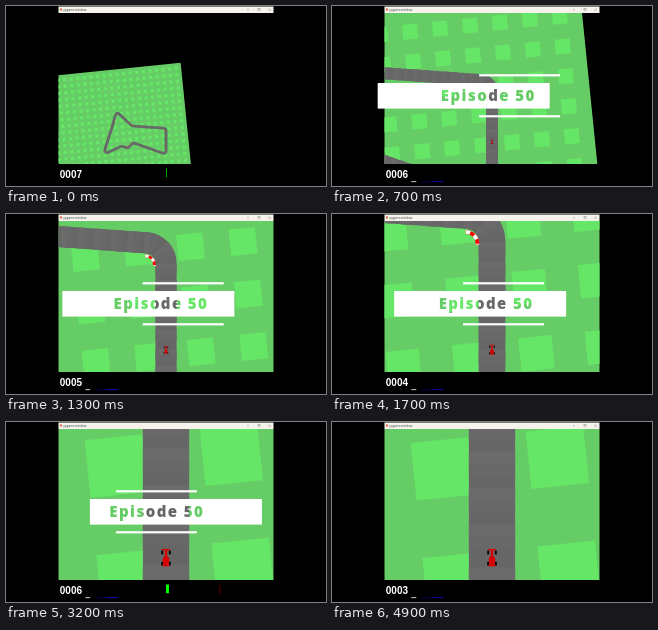
An HTML page with a canvas for the animation above (5000 ms loop, 320x180 px).

```html
<!DOCTYPE html>
<html>
<head>
<meta charset="utf-8">
<style>
html, body { margin: 0; height: 100%; overflow: hidden; background: #000; }
canvas { display: block; width: 320px; height: 180px; }
</style>
</head>
<body>
<canvas id="stage" width="320" height="180"></canvas>
<script>
const g = document.getElementById('stage').getContext('2d');
const layer = Object.assign(document.createElement('canvas'), { width: 320, height: 180 });
const b = layer.getContext('2d');
const LOOP = 5000, STEP = 100;
const HALF = 1000 / 3, TILE = HALF / 20, ROAD = 40 / 3;

// time (s), pixels per world unit
const zooms = [[0, .198], [.4, .534], [1, 1.27], [3.1, 3.467], [5, 3.467]];

// road corners around the car: x, y, bend radius
const corners = [[0, -64.6, 13], [-172, -77, 22], [-251, -151, 12], [-268, -85, 60],
  [-317, 68, 12], [-222, 24, 20], [-194, 36, 14], [-165, 8, 16], [0, 66, 12]];

const road = new Path2D();
road.moveTo(0, 0);
corners.forEach(([x, y, r], i) => {
  const [nx, ny] = corners[i + 1] || [0, 0];
  road.arcTo(x, y, nx, ny, r);
});
road.closePath();

function box(color, x, y, w, h) {
  g.fillStyle = color;
  g.fillRect(x, y, w, h);
}

function zoomAt(t) {
  const i = zooms.findIndex(k => k[0] > t);
  const [t0, z0] = zooms[i - 1], [t1, z1] = zooms[i];
  return z0 + (z1 - z0) * (t - t0) / (t1 - t0);
}

// distance driven: the car rolls out slowly
const driven = t => .8 - 5 * (1 - t / 5) ** 1.75;

function drawField() {
  g.save();
  g.rotate(-5.8 * Math.PI / 180);
  g.translate(-219.9, -52.8);
  box('#66cc66', -HALF, -HALF, 2 * HALF, 2 * HALF);
  for (let i = 0; i < 20; i++)
    for (let j = 0; j < 20; j++)
      box('#66e666', -HALF + 2 * i * TILE, -HALF + (2 * j + 1) * TILE, TILE, TILE);
  g.restore();
}

function drawKerb(x, y, r, from, to) {
  g.lineWidth = 1.8;
  [['#f00', []], ['#fff', [2.3, 2.3]]].forEach(([color, dash]) => {
    g.strokeStyle = color;
    g.setLineDash(dash);
    g.beginPath();
    g.arc(x, y, r, from, to);
    g.stroke();
  });
  g.setLineDash([]);
}

function drawRoad() {
  g.lineWidth = ROAD;
  g.strokeStyle = '#666';
  g.stroke(road);
  ['#686868', '#6b6b6b'].forEach((color, i) => {
    g.strokeStyle = color;
    g.setLineDash([3.5, 7]);
    g.lineDashOffset = -3.5 * (i + 1);
    g.stroke(road);
  });
  g.setLineDash([]);
  g.lineDashOffset = 0;
  drawKerb(-13, -51.6, 5.7, -1.6, .1);
  drawKerb(-168, -98, 14, 1.6, 2.3);
  drawKerb(-194, 15, 12, .8, 2.2);
}

function drawCar() {
  g.save();
  g.scale(.02, .02);
  for (const x of [-55, 55])
    for (const y of [-80, 82]) box('#000', x - 14, y - 27, 28, 54);
  const red = '#d80000';
  box(red, -60, -130, 120, 20);
  box(red, -17, -120, 34, 110);
  box(red, -50, 90, 100, 30);
  g.beginPath();
  g.ellipse(0, 35, 48, 60, 0, 0, 7);
  g.fill();
  g.restore();
}

function drawGame(t) {
  const zoom = zoomAt(t);
  g.save();
  g.beginPath();
  g.rect(52.5, 7, 215, 151);
  g.clip();
  g.translate(160, 136);
  g.scale(zoom, zoom);
  g.save();
  g.translate(0, driven(t));
  drawField();
  drawRoad();
  g.restore();
  drawCar();
  g.restore();
}

function drawTitleBar() {
  box('#f6f3ec', 52.5, .5, 215, 6.5);
  box('#d8683c', 54, 2.5, 2, 2);
  g.fillStyle = '#444';
  g.font = '3px "Open Sans", sans-serif';
  g.fillText('pygame window', 57.5, 4.8);
  box('#888', 241, 3.6, 2, .5);
  g.strokeStyle = '#888';
  g.lineWidth = .5;
  g.strokeRect(252, 2.7, 2, 2);
  g.beginPath();
  g.moveTo(262.5, 2.6); g.lineTo(264.7, 4.8);
  g.moveTo(264.7, 2.6); g.lineTo(262.5, 4.8);
  g.stroke();
}

function drawPanel(t) {
  // a new road tile adds to the score, time takes from it
  const score = Math.floor(7.55 - 1.57 * t + (t >= 3 ? 3.85 : 0));
  g.fillStyle = '#fff';
  g.font = 'bold 10px "Liberation Sans", Arial, sans-serif';
  g.fillText(String(score).padStart(4, '0'), 53.8, 172);

  const pulse = (at, size) => Math.max(0, size * (1 - Math.abs(t - at) / .3));
  const steer = pulse(0, .7) + pulse(1, 9) + pulse(3.2, 3);
  box('#0f0', 160, 162.5, steer, 8.7);
  if (t > .2) {
    if (steer) box('#600', 213.3, 163, 1, 8.5);
    box('#ddd', 79.3, 175.2, 5, .9);
    box('#000090', 89.5, 175.6, 11, .6);
    box('#1400c8', 100.5, 175.2, 11, .9);
  }
}

function drawBanner(t) {
  const slide = v => 162 * Math.max(0, v / .39) ** 3;
  const shift = slide(t - 3.6) - slide(.79 - t);
  b.clearRect(0, 0, 320, 180);
  b.fillStyle = '#fff';
  b.fillRect(37.5 + 14.5 * t + shift, 77, 172, 25.6);
  b.globalCompositeOperation = 'destination-out';
  b.font = '800 15px "Open Sans", sans-serif';
  b.letterSpacing = '1.4px';
  b.fillText('Episode 50', 110.4 - 2.2 * t, 95.3);
  b.globalCompositeOperation = 'source-over';
  for (const y of [68.2, 109.2]) b.fillRect(155 - 14.1 * t - shift, y, 81, 2.2);
  g.drawImage(layer, 0, 0);
}

function draw(now) {
  const t = Math.floor(now % LOOP / STEP) * STEP / 1000;
  box('#000', 0, 0, 320, 180);
  drawGame(t);
  drawTitleBar();
  drawPanel(t);
  drawBanner(t);
}

const start = performance.now();
function tick() {
  draw(performance.now() - start);
  requestAnimationFrame(tick);
}
tick();
</script>
</body>
</html>
```
